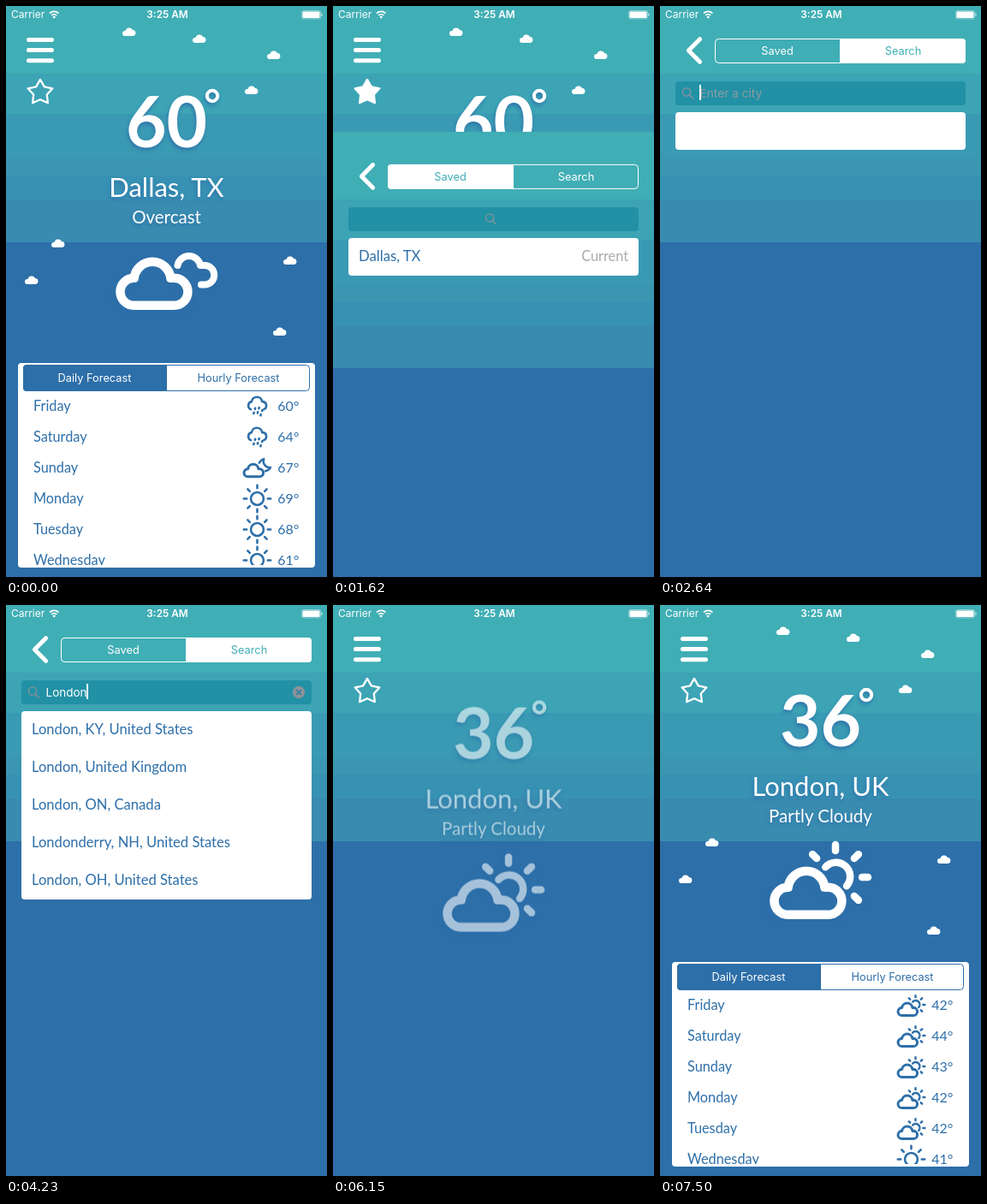
Write an HTML page that moves like this. It is 375x667 px and loops after 8.82 s.

```html
<!DOCTYPE html>
<html lang="en">
<head>
<meta charset="utf-8">
<title>Weather</title>
<style>
html, body { margin: 0; width: 100%; height: 100%; overflow: hidden; background: #2d6fa9; }
svg { display: block; width: 375px; height: 667px; }
text { font-family: Lato, "Open Sans", sans-serif; }
.ui { font-family: Inter, Roboto, sans-serif; font-size: 12.8px; }
.line { fill: none; stroke: currentColor; stroke-width: 9; stroke-linecap: round; stroke-linejoin: round; }
.white { color: #fff; fill: #fff; }
.blue { color: #2d6fa9; fill: #2d6fa9; }
.mid { text-anchor: middle; }
.end { text-anchor: end; }
.weather { filter: drop-shadow(-1px 3px 2px rgba(45, 111, 169, .85)); }
</style>
</head>
<body>
<svg id="stage" viewBox="0 0 375 667"></svg>
<script>
const LOOP = 8820, BLUE = '#2d6fa9', TEAL = '#40aeb5';
const stage = document.getElementById('stage');
const $ = id => document.getElementById(id);

// Drawing helpers
const label = (x, y, s, size, cls = '', more = '') =>
  `<text x="${x}" y="${y}" class="${cls}" style="${size ? `font-size:${size}px` : ''}" ${more}>${s}</text>`;
const box = (x, y, w, h, r, fill, more = '') =>
  `<rect x="${x}" y="${y}" width="${w}" height="${h}" rx="${r}" fill="${fill}" ${more}/>`;
const line = (d, more = '') => `<path class="line" d="${d}" ${more}/>`;
const leftHalf = (x, y, w, h, fill) =>
  `<path fill="${fill}" d="M${x + w} ${y}h${4 - w}a4 4 0 0 0-4 4v${h - 8}a4 4 0 0 0 4 4h${w - 4}z"/>`;
const rightHalf = (x, y, w, h, fill) =>
  `<path fill="${fill}" d="M${x} ${y}h${w - 4}a4 4 0 0 1 4 4v${h - 8}a4 4 0 0 1-4 4h${4 - w}z"/>`;

const rays = (from, to, first, count) => {
  let d = '';
  for (let i = 0; i < count; i++) {
    const a = (first + i * 45) * Math.PI / 180, c = Math.cos(a), s = Math.sin(a);
    d += `M${c * from} ${s * from}L${c * to} ${s * to}`;
  }
  return d;
};

const sky = () => [[0, TEAL], [79, '#3ca4b5'], [126, '#3a9ab3'], [178, '#3a96b1'],
  [198, '#3791b3'], [226, '#398bb0'], [276, BLUE]]
  .map(([y, c]) => box(0, y, 375, 667 - y, 0, c)).join('');

// Icons, centred on the origin
const cloud = (x, y) =>
  line('M-23-.7a16 16 0 0 1 0-32h.2A21.5 21.5 0 0 1 19.9-32.7h4a16 16 0 0 1 0 32z',
    `transform="translate(${x} ${y})" style="stroke-width:10.5"`);
const icons = {
  overcast: cloud(-15, 29) +
    line('M13-18.5A13.5 13.5 0 0 1 39.5-18.5h5a11 11 0 0 1 0 22.5h-4', 'style="stroke-width:8"'),
  partly: cloud(-15, 41) + `<g transform="translate(17.5 -3.5)">` +
    line('M-11.7-11.7A16.5 16.5 0 0 1 13 10.2' + rays(31, 38, -135, 5), 'style="stroke-width:8.5"') + '</g>',
  sun: line('M26 0a26 26 0 1 1-52 0a26 26 0 1 1 52 0' + rays(43, 55, 0, 8)),
  rain: line('M-26 11a16.5 16.5 0 0 1 3-31.5h.2A21.5 21.5 0 0 1 19.9-20.5h4a16.5 16.5 0 0 1 3 31.5') +
    line('M-8 6l-9 30M8 4l-11 36M21 14l-8 24', 'stroke-dasharray="4 15"'),
  moon: cloud(-15, 35) + line('M8-22A31 31 0 0 1 27-38A26 26 0 0 0 54-3A30 30 0 0 1 34 11')
};
const icon = (name, x, y, k) => `<g transform="translate(${x} ${y}) scale(${k})">${icons[name]}</g>`;

const starPath = () => {
  let d = '';
  for (let i = 0; i < 10; i++) {
    const r = i % 2 ? 8.2 : 15.1, a = i * Math.PI / 5;
    d += (i ? 'L' : 'M') + (40 + r * Math.sin(a)) + ' ' + (101 - r * Math.cos(a));
  }
  return d + 'z';
};

const weather = (id, temp, city, sky, kind) => `<g id="${id}" class="weather white">
  ${label(187.5, 165, temp, 82, 'mid', 'font-weight="700"')}
  <circle cx="241" cy="105" r="6.2" fill="none" stroke="#fff" stroke-width="4"/>
  ${label(187.5, 223, city, 31, 'mid')}${label(187.5, 254, sky, 20.5, 'mid')}
  ${icon(kind, 187.5, 321.5, 1)}</g>`;

const days = ['Friday', 'Saturday', 'Sunday', 'Monday', 'Tuesday', 'Wednesday'];
const forecast = (id, list) => `<g id="${id}" class="blue" clip-path="url(#rows)">` +
  list.map(([kind, temp], i) => {
    const y = 467 + i * 36;
    return label(32, y + 5.8, days[i], 16.3) + label(342.5, y + 5.8, temp + '°', 16, 'end') +
      icon(kind, 293.5, y + (kind === 'sun' ? 0.5 : 1), .286);
  }).join('') + '</g>';

const clouds = [[144, 30], [226, 38], [313, 57], [287, 98], [61, 277], [30, 320], [332, 297], [320, 380]];
const cities = ['London, KY, United States', 'London, United Kingdom', 'London, ON, Canada',
  'Londonderry, NH, United States', 'London, OH, United States'];

const tabs = (id, saved) => `<g id="${id}">
  ${box(64.5, 38.5, 292, 28, 4, 'none', 'stroke="#fff"')}
  ${saved ? leftHalf(64, 38, 147, 29, '#fff') : rightHalf(210, 38, 147, 29, '#fff')}
  ${label(137, 57, 'Saved', 0, 'ui mid', `fill="${saved ? TEAL : '#fff'}"`)}
  ${label(284, 57, 'Search', 0, 'ui mid', `fill="${saved ? '#fff' : TEAL}"`)}</g>`;

stage.innerHTML = `
<clipPath id="rows">${box(14, 450, 347, 203, 0, '#000')}</clipPath>
<clipPath id="listClip"><rect id="listMask" x="18" y="124" width="339" rx="4"/></clipPath>
${sky()}
<g class="white">
  ${line('M26.5 39.6h27M26.5 51.6h27M26.5 63.8h27', 'style="stroke-width:5"')}
  <path id="star" d="${starPath()}" stroke="#fff" stroke-width="2.3" stroke-linejoin="round"/>
  ${clouds.map(() => '<path class="puff" d="M-5 5A3 3 0 0 1-5-1H-4.5A4.6 4.6 0 0 1 4-2A3.6 3.6 0 0 1 5 5z"/>').join('')}
</g>
${weather('now1', '60', 'Dallas, TX', 'Overcast', 'overcast')}
${weather('now2', '36', 'London, UK', 'Partly Cloudy', 'partly')}
<g id="card">
  ${box(14, 417, 347, 239, 4, '#fff')}
  ${box(20.5, 419.5, 334, 30, 4, '#fff', `stroke="${BLUE}"`)}${leftHalf(20, 419, 168, 31, BLUE)}
  ${label(103.5, 439, 'Daily Forecast', 0, 'ui mid white')}
  ${label(271.5, 439, 'Hourly Forecast', 0, 'ui mid blue')}
  ${forecast('days1', [['rain', 60], ['rain', 64], ['moon', 67], ['sun', 69], ['sun', 68], ['sun', 61]])}
  ${forecast('days2', [['partly', 42], ['partly', 44], ['partly', 43], ['partly', 42], ['partly', 42], ['sun', 41]])}
</g>
<g id="panel">
  ${sky()}
  <g class="white">${line('M46.6 38.7L33.4 52L46.6 65.3', 'style="stroke-width:5"')}</g>
  ${tabs('tab1', true)}${tabs('tab2', false)}
  ${box(18, 88, 339, 28, 4, '#2291a5')}
  <g id="lens">
    <g fill="none" stroke="#8e9299" stroke-width="1.3" stroke-linecap="round">
      <circle cx="31" cy="100.5" r="4.6"/><path d="M34.4 104l4 4"/></g>
    ${label(46.5, 106.5, 'Enter a city', 13.7, 'ui', 'id="hint" fill="#8e9ba2"')}
  </g>
  ${label(46.5, 106.5, '', 13.5, 'ui white', 'id="typed"')}
  <rect id="caret" y="92" width="2" height="18" fill="#fff"/>
  <g id="clear"><circle cx="342" cy="102" r="7.2" fill="#8e9299"/>
    <path d="M339 99l6 6m0-6l-6 6" stroke="#2280a5" stroke-width="1.5"/></g>
  <g clip-path="url(#listClip)">
    ${box(18, 124, 339, 220, 0, '#fff')}
    <g id="saved">${label(30, 151, 'Dallas, TX', 16.7, 'blue')}${label(345, 151, 'Current', 16.3, 'end', 'fill="#aaa"')}</g>
    <g id="found" class="blue">${cities.map((c, i) => label(30, 151 + i * 44, c, 16.6)).join('')}</g>
  </g>
</g>
<g class="white">
  ${label(6, 14.4, 'Carrier', 12, 'ui')}
  ${label(188.5, 14.4, '3:25 AM', 11.8, 'ui mid', 'font-weight="600"')}
  <g fill="none" stroke="#fff" stroke-width="1.7">
    <path d="M51 8.6a7.3 7.3 0 0 1 10.4 0M53.2 11a4.3 4.3 0 0 1 6 0"/></g>
  <path d="M56.2 14.8l-1.9-2a2.7 2.7 0 0 1 3.8 0z"/>
  ${box(345.5, 5.5, 22, 9.5, 2, 'none', 'stroke="#fff" stroke-opacity=".4"')}
  ${box(346.5, 6.5, 20, 7.5, 1, '#fff')}${box(368.2, 8.5, 1.4, 3.5, .7, '#fff', 'opacity=".6"')}
</g>`;

// Timing helpers
const ramp = (t, start, length) => Math.min(1, Math.max(0, (t - start) / length));
const out = u => 1 - (1 - u) ** 3;
const ease = x => {  // cubic-bezier(.25, .1, .25, 1)
  let a = 0, b = 1;
  for (let i = 0; i < 20; i++) {
    const s = (a + b) / 2, r = 1 - s;
    if (.75 * s * r + s ** 3 < x) a = s; else b = s;
  }
  const r = 1 - a;
  return .3 * a * r * r + 3 * a * a * r + a ** 3;
};
const alpha = (id, v) => { $(id).style.opacity = v; };
const move = (el, x, y) => el.setAttribute('transform', `translate(${x} ${y})`);

const puffs = [...document.querySelectorAll('.puff')];
const keys = [3270, 3540, 3690, 3810, 3930, 4080];

function draw(t) {
  const later = t >= 5005;

  // Main screen
  $('star').style.fillOpacity = ramp(t, 645, 285) - ramp(t, 5640, 210);
  alpha('now1', later ? 0 : 1);
  alpha('now2', out(ramp(t, 6075, 300)));
  move($('now2'), 0, 28 * (1 - out(ramp(t, 6075, 390))));
  alpha('card', later ? ease(ramp(t, 6630, 600)) : 1);
  alpha('days1', later ? 0 : 1);
  alpha('days2', later ? 1 : 0);
  const drift = later ? out(ramp(t, 6615, 885)) : 1;
  clouds.forEach(([x, y], i) => {
    const from = x < 187 ? -10 : 385;
    move(puffs[i], from + (x - from) * drift, y);
  });

  // City panel
  move($('panel'), 0, 667 * (1 - ease(ramp(t, 1315, 640)) + ease(ramp(t, 5003, 580))));
  const tab = ramp(t, 2085, 150);
  alpha('tab1', 1 - tab);
  alpha('tab2', tab);
  alpha('saved', 1 - tab);
  const focus = ease(ramp(t, 2180, 430));
  move($('lens'), 152 * (1 - focus), 0);

  const n = keys.filter(k => t >= k).length;
  $('typed').textContent = 'London'.slice(0, n);
  alpha('hint', n ? 0 : focus);
  alpha('clear', ramp(t, 3255, 135));
  $('caret').setAttribute('x', 46 + (n ? $('typed').getComputedTextLength() : 0));
  alpha('caret', ramp(t, 2540, 100) - ramp(t, 4515, 195) + ramp(t, 5025, 120));

  const grow = later ? 0 : ease(ramp(t, 4090, 140));
  $('listMask').setAttribute('height', 44 + 176 * grow);
  alpha('found', ramp(t, 4090, 90));
}

function tick(now) {
  draw(now % LOOP);
  requestAnimationFrame(tick);
}
draw(0);
requestAnimationFrame(tick);
</script>
</body>
</html>
```
